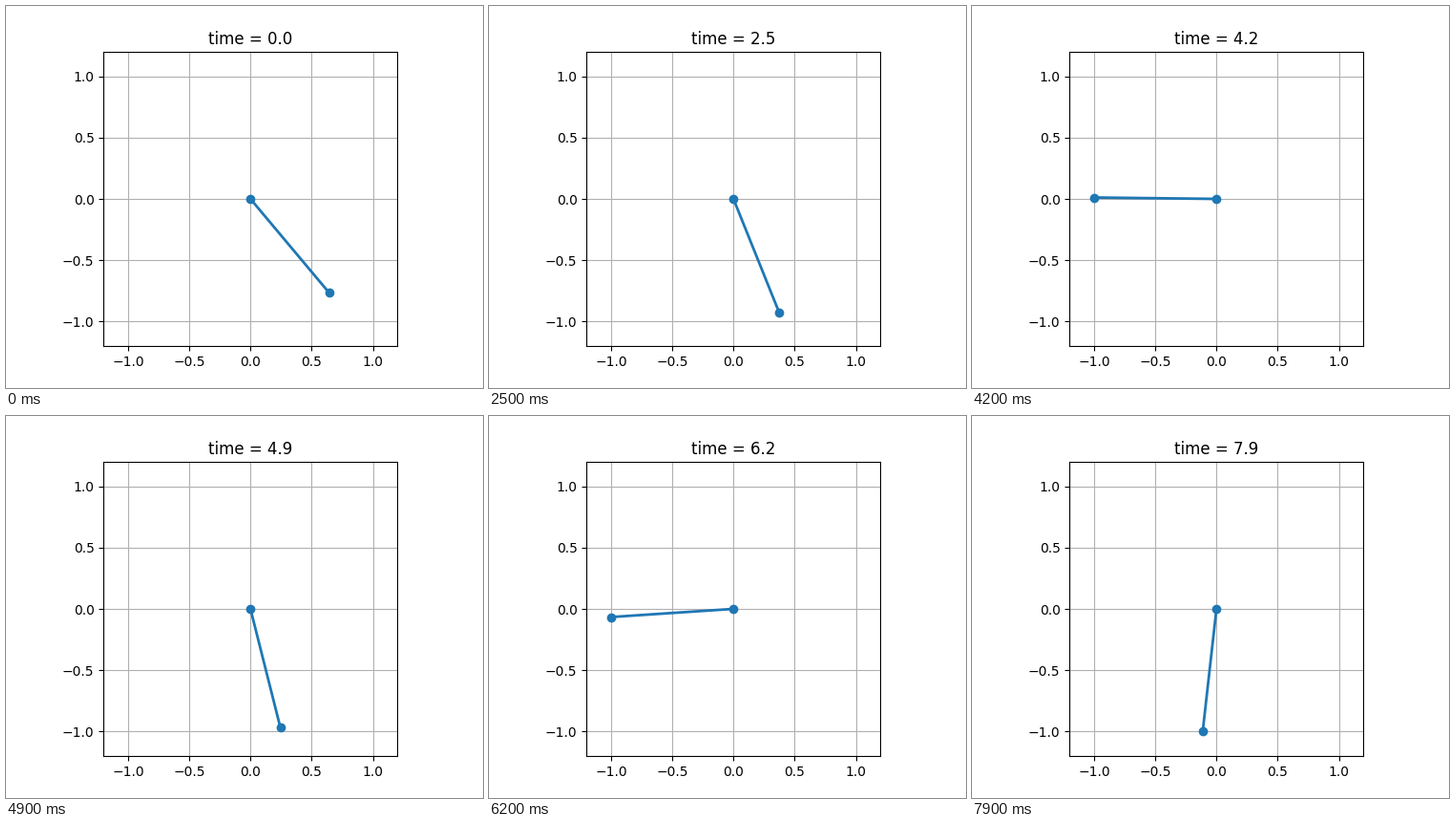
A matplotlib script that plays this animation: 500x400 px, repeating every 8 s.

```python
import math

import matplotlib.pyplot as plt
import numpy as np
from matplotlib.animation import FuncAnimation

FRAMES = 80
DT = 0.1       # seconds per frame
SUB = 5        # integration steps per frame
START = math.radians(40)

# Known poses: frame step and angle in degrees from straight down.
POSES = np.array([
    (2, 48.2), (9, -67.5), (12, -105.3), (25, 22.3), (27, 39.7),
    (35, -64.7), (36, -77.3), (45, -53.7), (49, 14.4), (52, 33.0),
    (54, 20.0), (62, -86.4), (75, 27.3), (79, -6.3),
])
STEPS = POSES[:, 0].astype(int)
ANGLES = np.radians(POSES[:, 1])


def swing(params):
    """Angles of a damped pendulum under a constant torque (RK4)."""
    gravity, drag, torque, speed = map(float, params)
    h = DT / SUB

    def acc(a, v):
        return -gravity * math.sin(a) - drag * v - torque

    a, v = START, speed
    angles = [a]
    for _ in range(FRAMES - 1):
        for _ in range(SUB):
            k1 = acc(a, v)
            v2 = v + h / 2 * k1
            k2 = acc(a + h / 2 * v, v2)
            v3 = v + h / 2 * k2
            k3 = acc(a + h / 2 * v2, v3)
            v4 = v + h * k3
            k4 = acc(a + h * v3, v4)
            a += h / 6 * (v + 2 * v2 + 2 * v3 + v4)
            v += h / 6 * (k1 + 2 * k2 + 2 * k3 + k4)
        angles.append(a)
    return np.array(angles)


def error(params):
    return swing(params)[STEPS] - ANGLES


def calibrate(params, rounds=40):
    """Levenberg-Marquardt fit of the pendulum to the known poses."""
    params = np.array(params, float)
    err, damp, eps = error(params), 1e-2, 1e-5
    for _ in range(rounds):
        jac = np.column_stack([(error(params + eps * e) - err) / eps
                               for e in np.eye(len(params))])
        normal = jac.T @ jac
        lhs = normal + damp * np.diag(np.diag(normal))
        trial = params - np.linalg.solve(lhs, jac.T @ err)
        trial_err = error(trial)
        if trial_err @ trial_err < err @ err:
            params, err, damp = trial, trial_err, damp / 4
        else:
            damp *= 5
    return params


# gravity / length, drag, torque, initial angular speed
theta = swing(calibrate([9.81, 0.095, 4.0, 1.85]))

fig, ax = plt.subplots(figsize=(5, 4), dpi=100)
ax.set_xlim(-1.2, 1.2)
ax.set_ylim(-1.2, 1.2)
ax.set_aspect("equal")
ax.set_xticks(np.arange(-1, 1.1, 0.5))
ax.set_yticks(np.arange(-1, 1.1, 0.5))
ax.grid(True)
rod, = ax.plot([], [], "o-", lw=2)
title = ax.set_title("time = 0.0")


def draw(i):
    a = theta[i]
    rod.set_data([0, math.sin(a)], [0, -math.cos(a)])
    title.set_text(f"time = {i * DT:.1f}")
    return rod, title


anim = FuncAnimation(fig, draw, frames=FRAMES, interval=100, repeat=True)
plt.show()
```
